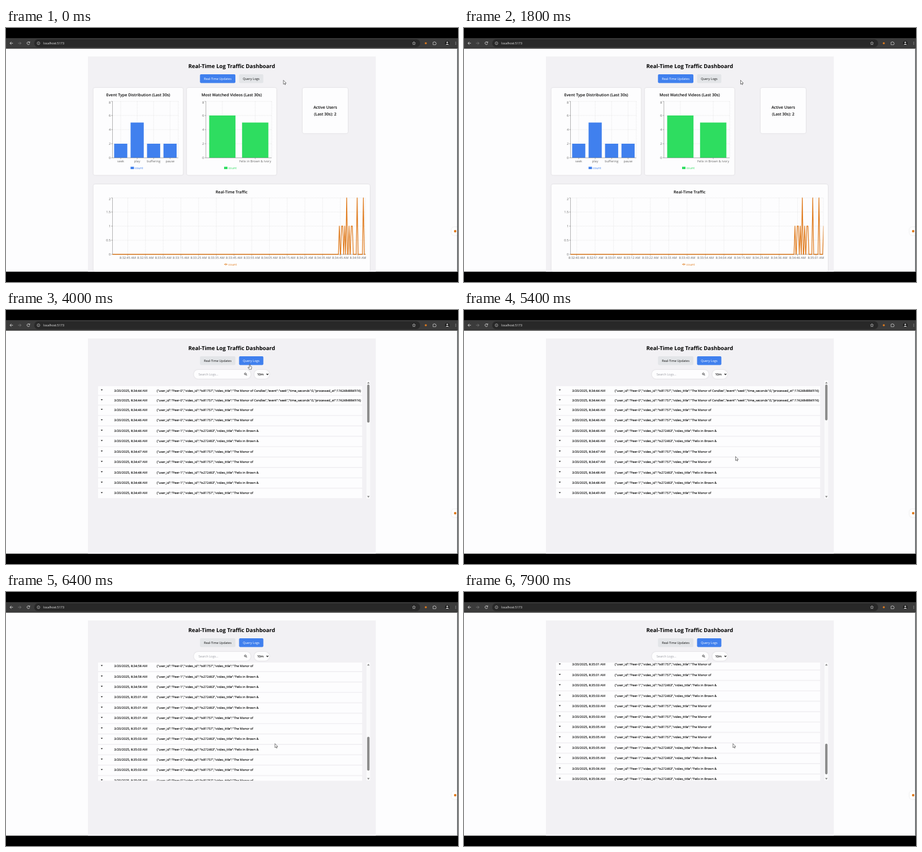
Animation of 800x450 px, one loop 8 s. Source, as an HTML page:

```html
<!DOCTYPE html>
<html lang="en">
<head>
<meta charset="utf-8">
<title>Log dashboard</title>
<style>
  html, body { margin: 0; width: 100%; height: 100%; overflow: hidden; background: #000; }
  svg { display: block; width: 800px; height: 450px; }
  text { font-family: "Open Sans", "Noto Sans", sans-serif; font-size: 5.6px; fill: #000; text-rendering: geometricPrecision; white-space: pre; }
  .title { font-size: 9.6px; font-weight: 700; }
  .head { font-size: 7.05px; font-weight: 600; }
  .tick { fill: #666; }
  .row { stroke: #000; stroke-width: .1; }
  .log { font-size: 5.53px; }
  .grid { stroke: #ccc; stroke-width: .45; stroke-dasharray: 1.25 1.25; }
  .axis { stroke: #666; stroke-width: .5; }
  .card { filter: drop-shadow(0 .9px 1px rgba(0, 0, 0, .13)); }
</style>
</head>
<body>
<svg id="stage" viewBox="0 0 800 450"></svg>
<script>
const LOOP = 8000;
const SWITCH_AT = 4000;
const TOP = 36.7, BOTTOM = 431.7;
const BLUE = '#4080ee', GREEN = '#2edd60', ORANGE = '#e07b1d';
const PAGE = '#fdfdfe', PANEL = '#f2f1f4', IDLE = '#e3e5e8';
const stage = document.getElementById('stage');

function add(parent, tag, attrs = {}, content) {
  const el = document.createElementNS('http://www.w3.org/2000/svg', tag);
  for (const key in attrs) el.setAttribute(key, attrs[key]);
  if (content !== undefined) el.textContent = content;
  parent.appendChild(el);
  return el;
}
const rect = (p, x, y, w, h, fill, more) => add(p, 'rect', { x, y, width: w, height: h, fill, ...more });
const line = (p, x1, y1, x2, y2, cls) => add(p, 'line', { x1, y1, x2, y2, class: cls });
const path = (p, d, more) => add(p, 'path', { d, fill: 'none', ...more });
const circle = (p, cx, cy, r, fill, more) => add(p, 'circle', { cx, cy, r, fill, ...more });
const text = (p, x, y, str, cls = '', anchor = 'start', more) =>
  add(p, 'text', { x, y, class: cls, 'text-anchor': anchor, ...more }, str);
const card = (p, x, y, w, h, r = 3.3) => rect(p, x, y, w, h, PAGE, { rx: r, class: 'card' });
const show = (el, on) => el.setAttribute('visibility', on ? 'visible' : 'hidden');

function clip(id, x, y, w, h) {
  rect(add(stage, 'clipPath', { id }), x, y, w, h, '#000');
  return { 'clip-path': `url(#${id})` };
}

// Browser frame
rect(stage, 0, 0, 800, 450, '#000');
rect(stage, 0, 18, 800, 19, '#3b3b3b');
rect(stage, 50, 20, 683, 14, '#282828', { rx: 7 });
const icon = { stroke: '#dedede', 'stroke-width': .9 };
path(stage, 'M12.3 27H7M9.4 24.5L6.9 27l2.5 2.5', icon);
path(stage, 'M21.3 27h5.3M24.2 24.5l2.5 2.5l-2.5 2.5', { ...icon, stroke: '#777' });
path(stage, 'M41.6 25.6A2.4 2.4 0 1 0 41.9 27.6M42 24v1.9h-1.9', icon);
circle(stage, 57.5, 27, 2.5, 'none', { ...icon, 'stroke-width': .6 });
path(stage, 'M57.5 26.7v1.8M57.5 25.4v.6', { ...icon, 'stroke-width': .6 });
text(stage, 66, 29, 'localhost:5173', '', 'start', { style: 'font-size:5.5px;fill:#f0f0f0' });
path(stage, 'M722 24.2l.8 1.9l2 .2l-1.5 1.4l.4 2l-1.7-1l-1.7 1l.4-2l-1.5-1.4l2-.2z', { ...icon, 'stroke-width': .6 });
circle(stage, 743, 27, 1.8, ORANGE);
path(stage, 'M755.8 25.2h1.5a.9.9 0 0 1 1.8 0h1.6v1.5a.9.9 0 0 1 0 1.8v1.2h-4.9z', { ...icon, 'stroke-width': .7 });
circle(stage, 781, 27, 4, '#1d1d1d');
path(stage, 'M778.2 29.8a2.9 2.6 0 0 1 5.6 0z', { fill: '#e2e2e2' });
circle(stage, 781, 25.6, 1.5, '#bcbcbc');
for (const y of [25, 27, 29]) circle(stage, 796, y, .55, '#ddd');
rect(stage, 0, TOP, 800, BOTTOM - TOP, PAGE);

// Shared page header
const page = add(stage, 'g', clip('page', 0, TOP, 800, BOTTOM - TOP));
rect(page, 145, 50.5, 509.5, 382, PANEL);
text(page, 399.5, 71, 'Real-Time Log Traffic Dashboard', 'title', 'middle');

function button(x, w, label) {
  const box = rect(page, x, 82.1, w, 15.3, IDLE, { rx: 1.8 });
  const cap = text(page, x + w / 2, 92, label, '', 'middle');
  return active => {
    box.setAttribute('fill', active ? BLUE : IDLE);
    cap.style.fill = active ? '#fff' : '#111';
  };
}
const liveButton = button(343.3, 62.7, 'Real-Time Updates');
const queryButton = button(412.5, 43, 'Query Logs');

// Charts view
const charts = add(page, 'g');

function yAxis(x, top, right, labels) {
  labels.forEach((label, i) => {
    const y = top + i * 100 / (labels.length - 1);
    line(charts, x, y, right, y, 'grid');
    line(charts, x - 2.5, y, x, y, 'axis');
    text(charts, x - 3.4, y + (i ? 2 : 4), label, 'tick', 'end');
  });
  line(charts, x, top, x, top + 100, 'axis');
  line(charts, right, top, right, top + 100, 'grid');
}

function barChart(x, title, color, bars, legendX) {
  const left = x + 33.7, width = 116.4, step = width / bars.length;
  card(charts, x, 106, 158.5, 154.5);
  text(charts, x + 79.2, 121.2, title, 'head', 'middle');
  yAxis(left, 130, left + width, ['8', '6', '4', '2', '0']);
  bars.forEach(([label, value], i) => {
    const cx = left + (i + .5) * step;
    line(charts, cx, 130, cx, 230, 'grid');
    rect(charts, cx - step * .4, 230 - value * 12.5, step * .8, value * 12.5, color);
    if (!label) return;
    line(charts, cx, 230, cx, 232.5, 'axis');
    text(charts, cx, 238, label, 'tick', 'middle');
  });
  line(charts, left, 230, left + width, 230, 'axis');
  rect(charts, legendX, 245.8, 6, 4.2, color);
  text(charts, legendX + 7.4, 249.5, 'count', '', 'start', { style: `fill:${color}` });
}
barChart(154.8, 'Event Type Distribution (Last 30s)', BLUE,
  [['seek', 2], ['play', 5], ['buffering', 2], ['pause', 2]], 220.5);
barChart(320.1, 'Most Watched Videos (Last 30s)', GREEN,
  [['', 6], ['Felix in Brown & Ivory', 5]], 386);

card(charts, 525, 106, 80, 80.5);
text(charts, 565, 143.2, 'Active Users', 'head', 'middle');
text(charts, 565, 155, '(Last 30s): 2', 'head', 'middle');

card(charts, 154.8, 277, 489.2, 154.5);
text(charts, 399.3, 292.6, 'Real-Time Traffic', 'head', 'middle');
yAxis(188.5, 301, 636, ['2', '1.5', '1', '0.5', '0']);
line(charts, 188.5, 401, 636, 401, 'axis');
const ticks = Array.from({ length: 14 }, () => ({
  grid: line(charts, 0, 301, 0, 401, 'grid'),
  mark: line(charts, 0, 401, 0, 403.5, 'axis'),
  label: text(charts, 0, 408.8, '', 'tick', 'middle')
}));
const trace = path(add(charts, 'g', clip('plot', 188, 300, 448.3, 102)), '',
  { stroke: ORANGE, 'stroke-width': 1.3, 'stroke-linejoin': 'round' });
path(charts, 'M386 418.7h6', { stroke: ORANGE, 'stroke-width': .9 });
circle(charts, 389, 418.7, 1.2, PAGE, { stroke: ORANGE, 'stroke-width': .8 });
text(charts, 393.6, 420.6, 'count', '', 'start', { style: `fill:${ORANGE}` });

// Tick layout per update: first x, spacing, first second, seconds apart, last second
const TICKS = [
  [215.5, 31.35, 45, 10, 179],
  [213.4, 31.35, 45, 10, 180],
  [199.5, 32.57, 40.5, 10.5, 181],
  [201.8, 32.4, 41.5, 10.5, 181],
  [204, 32.22, 42, 10.5, 182],
  [201.9, 32.22, 42, 10.5, 183]
];
// Spikes: x, value, plateau width
const SPIKES = [[590, 1, 0], [594, 1, 2], [599.5, 1, 0], [603, 2, 0], [607.2, 1, 0],
  [611, 1, 2], [621.5, 2, 0], [632.5, 2, 0], [640.7, 1, 2.3]];
const pad = n => String(n).padStart(2, '0');
const clock = s => `8:${32 + Math.floor(s / 60)}:${pad(s % 60)} AM`;

let drawnUpdate = -1;
function drawTraffic(n) {
  if (n === drawnUpdate) return;
  drawnUpdate = n;
  const [x0, gap, start, every, last] = TICKS[n];
  ticks.forEach((tick, i) => {
    const x = x0 + i * gap;
    for (const l of [tick.grid, tick.mark]) {
      l.setAttribute('x1', x);
      l.setAttribute('x2', x);
    }
    tick.label.setAttribute('x', x);
    tick.label.textContent = clock(i === 13 ? last : Math.floor(start + i * every));
  });
  let d = 'M188.5 401';
  for (const [x, value, flat] of SPIKES) {
    const a = x - n * 2.12, b = a + flat, y = 401 - value * 50;
    d += `L${a - 1.7} 401L${a} ${y}L${b} ${y}L${b + 1.7} 401`;
  }
  trace.setAttribute('d', d + 'L660 401');
}

// Logs view
const logs = add(page, 'g');
card(logs, 332.5, 106, 100.5, 15.8, 7.9);
text(logs, 340.8, 116, 'Search Logs...', '', 'start', { style: 'font-size:5.5px;fill:#9a9ca3' });
circle(logs, 423.6, 113.2, 1.6, 'none', { stroke: '#111', 'stroke-width': .8 });
path(logs, 'M424.8 114.4l1.6 1.6', { stroke: '#111', 'stroke-width': 1 });
card(logs, 439.5, 106, 26.5, 15.8, 7.9);
text(logs, 444.4, 116, '10m', 'row');
path(logs, 'M461 112.9l1.7 1.7l1.7-1.7', { stroke: '#111', 'stroke-width': 1.1 });

// Each entry makes two rows: second, viewer
const PAIRS = [[44, 0], [46, 0], [46, 1], [47, 0], [48, 1], [49, 0], [50, 1], [52, 0], [53, 1], [55, 0],
  [56, 1], [58, 0], [58, 1], [61, 1], [61, 0], [63, 1], [63, 0], [65, 0], [65, 1], [66, 1]];
const rowY = k => k < 2 ? 142.5 + 17.4 * k : 177 + 18.42 * (k - 2);
const list = add(add(logs, 'g', clip('list', 160, 125, 475, 209.3)), 'g');
const rows = [];
for (let k = 0; k < 40; k++) {
  const [sec, who] = PAIRS[k >> 1], y = rowY(k), row = add(list, 'g');
  const video = who ? 'ts272463","video_title":"Felix in Brown &' : 'ts81757","video_title":"The Manor of';
  const tail = k < 2 ? ' Candles","event":"seek","time_seconds":0,"processed_at":1742484884974}' : '';
  rect(row, 163, y - 7.6, 467.3, k < 2 ? 15.3 : 16.5, PAGE, { rx: .6 });
  path(row, `M167.7 ${y - 1.7}h3.6l-1.8 2z`, { fill: '#111' });
  text(row, 191.6, y + 2, `3/20/2025, ${clock(120 + sec)}`, 'row');
  text(row, 266.4, y + 2, `{"user_id":"Peer-${who}","video_id":"${video}${tail}`, 'row log');
  rows.push(row);
}
rect(logs, 638, 125, 6.5, 209, '#fafafb');
path(logs, 'M639.2 130.2l2.2-3l2.2 3z', { fill: '#858585' });
path(logs, 'M639.2 329.6l2.2 3l2.2-3z', { fill: '#858585' });
const thumb = rect(logs, 639.2, 132, 4.2, 60, '#8a8a8a', { rx: 2 });

// Side widget and window edge
rect(page, 788.5, 353, 18, 14, '#fff', { rx: 5, class: 'card' });
circle(page, 795, 360, 2.2, ORANGE);
rect(stage, 798.6, TOP, 1.4, BOTTOM - TOP, '#454a4d');

// Pointers, tip at the origin
const arrow = path(stage, 'M0 0V7.2L1.7 5.7L2.8 8L3.9 7.5L2.8 5.3H5z',
  { fill: '#fff', stroke: '#222', 'stroke-width': .6 });
const hand = path(stage, 'M-.7 -3.6a.7.7 0 0 1 1.4 0V-.8L3 -.2Q3.5 0 3.4 .7L2.9 4.6H-1.1L-3.2 1.6Q-3.3 .5 -2.2 .9L-.7 2z',
  { fill: '#fff', stroke: '#222', 'stroke-width': .6 });

// Steps: time, then values; eased between steps
const POINTER = [[0, 491, 92.5], [1000, 491, 92.5], [1800, 489.5, 92.5], [2900, 431.5, 100.5],
  [4200, 431.5, 100.5], [5100, 480.6, 259.6], [5500, 480.6, 259.6], [6100, 476, 268.6], [8000, 476, 268.6]];
const SCROLL = [[0, 0], [5500, 0], [6400, 432.5], [6650, 469], [6750, 469], [6950, 506],
  [7550, 506], [7850, 527.5], [8000, 527.5]];
const COUNT = [[0, 32], [4700, 34], [6000, 36], [6700, 38], [7500, 40]];
const smooth = p => p * p * (3 - 2 * p);

function at(steps, t, ease = smooth) {
  const i = Math.max(1, steps.findIndex(s => s[0] > t));
  const a = steps[i - 1], b = steps[i];
  const p = ease((t - a[0]) / (b[0] - a[0]));
  return a.slice(1).map((v, j) => v + (b[j + 1] - v) * p);
}

function drawLogs(t) {
  const count = COUNT.filter(s => s[0] <= t).pop()[1];
  const height = rowY(count - 1) + 18.3 - 125;
  const [top] = at(SCROLL, t, p => p);
  rows.forEach((row, k) => row.setAttribute('display', k < count ? 'inline' : 'none'));
  list.setAttribute('transform', `translate(0 ${-top})`);
  thumb.setAttribute('y', 132 + 195 * top / height);
  thumb.setAttribute('height', 195 * 209 / height);
}

function drawPointer(t) {
  const [x, y] = at(POINTER, t);
  const over = x < 456 && y < 98 || x < 432 && y < 101;
  arrow.setAttribute('transform', `translate(${x} ${y})`);
  hand.setAttribute('transform', `translate(${x} ${y})`);
  show(arrow, !over);
  show(hand, over);
}

function draw(t) {
  const live = t < SWITCH_AT;
  liveButton(live);
  queryButton(!live);
  charts.setAttribute('display', live ? 'inline' : 'none');
  logs.setAttribute('display', live ? 'none' : 'inline');
  if (live) drawTraffic(Math.min(5, Math.floor((t + 400) / 800)));
  else drawLogs(t);
  drawPointer(t);
}

const begin = performance.now();
function tick() {
  draw((performance.now() - begin) % LOOP);
  requestAnimationFrame(tick);
}
tick();
</script>
</body>
</html>
```
